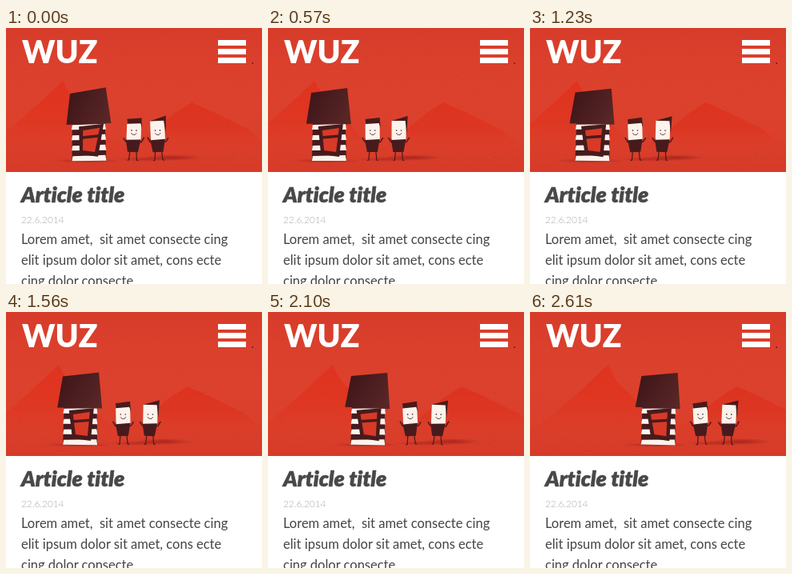
Animation, 320 px wide and 320 px high, one loop 2.64 s. Source, as an HTML page with a canvas:

```html
<!DOCTYPE html>
<html lang="en">
<head>
<meta charset="utf-8">
<title>Article</title>
<style>
  html, body { margin: 0; width: 100%; height: 100%; overflow: hidden; background: #fff; }
  canvas, svg { position: absolute; left: 0; top: 0; width: 320px; height: 320px; }
  text { font-family: Lato, sans-serif; font-variant-ligatures: none; }
  .logo { font-size: 39px; font-weight: 900; fill: #fff; }
  .title { font-size: 26.8px; font-weight: 900; font-style: italic; fill: #484848; stroke: #484848; stroke-width: 0.6px; }
  .date { font-size: 11.8px; font-weight: 300; fill: #aaa; }
  .copy { font-size: 16.5px; fill: #444; }
</style>
</head>
<body>
<canvas id="scene" width="320" height="320"></canvas>
<svg viewBox="0 0 320 320">
  <text class="logo" x="20" y="44">WUZ</text>
  <path d="M265 15h35v7h-35zm0 11h35v7h-35zm0 11h35v7h-35z" fill="#fff"/>
  <text class="title" x="19" y="218">Article title</text>
  <text class="date" x="19" y="244">22.6.2014</text>
  <text class="copy" x="19" y="270">Lorem amet,&#160; sit amet consecte cing</text>
  <text class="copy" x="19" y="296">elit ipsum dolor sit amet, cons ecte</text>
  <text class="copy" x="19" y="322">cing dolor consecte</text>
</svg>
<script>
const ctx = document.getElementById('scene').getContext('2d');
const LOOP = 2640, STEP = 30, HORIZON = 180;
const DARK = '#471b1d', WHITE = '#fbf3ec', RED = '#d83a27';

// Time and x of the walking group
const path = [[0, 159], [300, 146], [840, 121], [1230, 133], [1890, 165], [2340, 198], [2640, 217]];

function slope(i) {
  const a = path[Math.max(0, i - 1)], b = path[Math.min(path.length - 1, i + 1)];
  return (b[1] - a[1]) / (b[0] - a[0]);
}

function groupX(t) {
  let i = 0;
  while (i < path.length - 2 && t >= path[i + 1][0]) i++;
  const [t0, x0] = path[i], [t1, x1] = path[i + 1];
  const d = t1 - t0, u = (t - t0) / d, v = 1 - u;
  return x0 * (1 + 2 * u) * v * v + x1 * (3 - 2 * u) * u * u
    + d * u * v * (slope(i) * v - slope(i + 1) * u);
}

function poly(fill, ...xy) {
  ctx.fillStyle = fill;
  ctx.beginPath();
  for (let i = 0; i < xy.length; i += 2) ctx.lineTo(xy[i], xy[i + 1]);
  ctx.fill();
}

function line(width, ...xy) {
  ctx.strokeStyle = DARK;
  ctx.lineWidth = width;
  ctx.beginPath();
  for (let i = 0; i < xy.length; i += 2) ctx.lineTo(xy[i], xy[i + 1]);
  ctx.stroke();
}

function gradient(y0, y1, ...colors) {
  const g = ctx.createLinearGradient(0, y0, 0, y1);
  colors.forEach((c, i) => g.addColorStop(i / (colors.length - 1), c));
  return g;
}

function placed(x, y, angle, draw) {
  ctx.save();
  ctx.translate(x, y);
  ctx.rotate(angle);
  draw();
  ctx.restore();
}

let seed = 7;
const random = () => (seed = seed * 16807 % 2147483647) / 2147483647;
const specks = Array.from({ length: 450 }, () => ({
  x: random() * 320, y: random() * HORIZON, size: 0.5 + random() * 0.8, alpha: random() * 0.13
}));

function backdrop(x) {
  ctx.fillStyle = gradient(0, HORIZON, '#d73c2a', '#db402d', '#dc412d', '#db402c', '#d63b29');
  ctx.fillRect(0, 0, 320, HORIZON);

  const left = 71 + 0.47 * (x - 159), right = left + 161;
  poly(gradient(66, 165, '#e0331f', '#de3722', 'rgba(220,62,42,0)'),
    left, 66, left - 34, 98, left - 72, 131, left - 120, 165, left + 85, 165, left + 28, 103, left + 12, 88);
  poly(gradient(93, 160, '#dd331f', '#dc3723', 'rgba(219,62,42,0)'),
    right, 93, right - 22, 107, right - 48, 129, right - 95, 160, right + 110, 160, right + 72, 127, right + 25, 104);

  for (const s of specks) {
    ctx.fillStyle = `rgba(95,15,10,${s.alpha})`;
    ctx.fillRect(s.x, s.y, s.size, s.size);
  }
  ctx.fillStyle = '#7d1712';
  ctx.fillRect(307.5, 43, 1.5, 2);
}

function shadow(x, y, rx, ry, alpha) {
  ctx.save();
  ctx.translate(x, y);
  ctx.scale(rx, ry);
  const g = ctx.createRadialGradient(0, 0, 0, 0, 0, 1);
  g.addColorStop(0, `rgba(120,15,12,${alpha})`);
  g.addColorStop(1, 'rgba(120,15,12,0)');
  ctx.fillStyle = g;
  ctx.fillRect(-1, -1, 2, 2);
  ctx.restore();
}

function house(x, sway) {
  placed(x, 166, sway * 0.018, () => {
    poly(DARK, -20, -47, 21, -47, 22, 0, -21, 0);
    for (const y of [-45, -32, -19, -6]) {
      poly(WHITE, -20, y, 21, y - 1, 22, y + 6, -21, y + 6);
    }
    const k = sway * 1.5;
    poly(DARK, -13 - k, -43, 18 - k, -46, 13 + k, -5, -10 + k, -8);
    poly(RED, -8 - k, -38, 13 - k, -41, 9 + k, -11, -6 + k, -13);
    line(3.5, -10, -29, 14, -31);
  });
  placed(x, 120, sway * 0.045, () => {
    const g = ctx.createLinearGradient(-24, -30, 28, 0);
    g.addColorStop(0, '#40171a');
    g.addColorStop(1, '#5c2828');
    poly(g, -22, -39, 23, -45, 28, 0, -28, 0);
  });
}

function hairFringe() {
  poly(DARK, -9, -51, 9, -53, 10, -40, 8, -46, -9, -45);
}

function hairWedge() {
  poly(DARK, -9, -49, 11, -55, 10, -33, 8, -49);
}

function figure(x, sway, hair) {
  placed(x, 165, sway * 0.045, () => {
    line(1.2, -4, -11, -5, 0, -7, 0.5);
    line(1.2, 4, -11, 5, 0, 7, 0.5);
    line(1.5, -8, -22, -10, -23, -13, -28 + sway);
    line(1.5, 8, -22, 10, -23, 13, -28 - sway);
    poly(DARK, -10, -27, 9, -27, 6, -10, -7, -10);
    poly(WHITE, -9, -49, 9, -50, 9, -26, -9, -25);
    hair();
    ctx.fillStyle = DARK;
    for (const eye of [-3, 3]) {
      ctx.beginPath();
      ctx.arc(eye, -37, 0.8, 0, Math.PI * 2);
      ctx.fill();
    }
    ctx.strokeStyle = DARK;
    ctx.lineWidth = 0.8;
    ctx.beginPath();
    ctx.arc(0, -35, 3.5, 0.35, Math.PI - 0.35);
    ctx.stroke();
  });
}

function draw(now) {
  const t = Math.floor(now % LOOP / STEP) * STEP;
  const x = groupX(t);
  const sway = -Math.cos(2 * Math.PI * (t / 480 + 0.08));
  ctx.fillStyle = '#fff';
  ctx.fillRect(0, 0, 320, 320);
  backdrop(x);
  shadow(x - 58, 166, 44, 3, 0.4);
  shadow(x + 16, 164, 38, 3, 0.35);
  shadow(x + 50, 162, 36, 4, 0.5);
  house(x - 55.5, sway);
  figure(x - 0.5, -sway, hairFringe);
  figure(x + 32, sway, hairWedge);
  requestAnimationFrame(draw);
}
requestAnimationFrame(draw);
</script>
</body>
</html>
```
